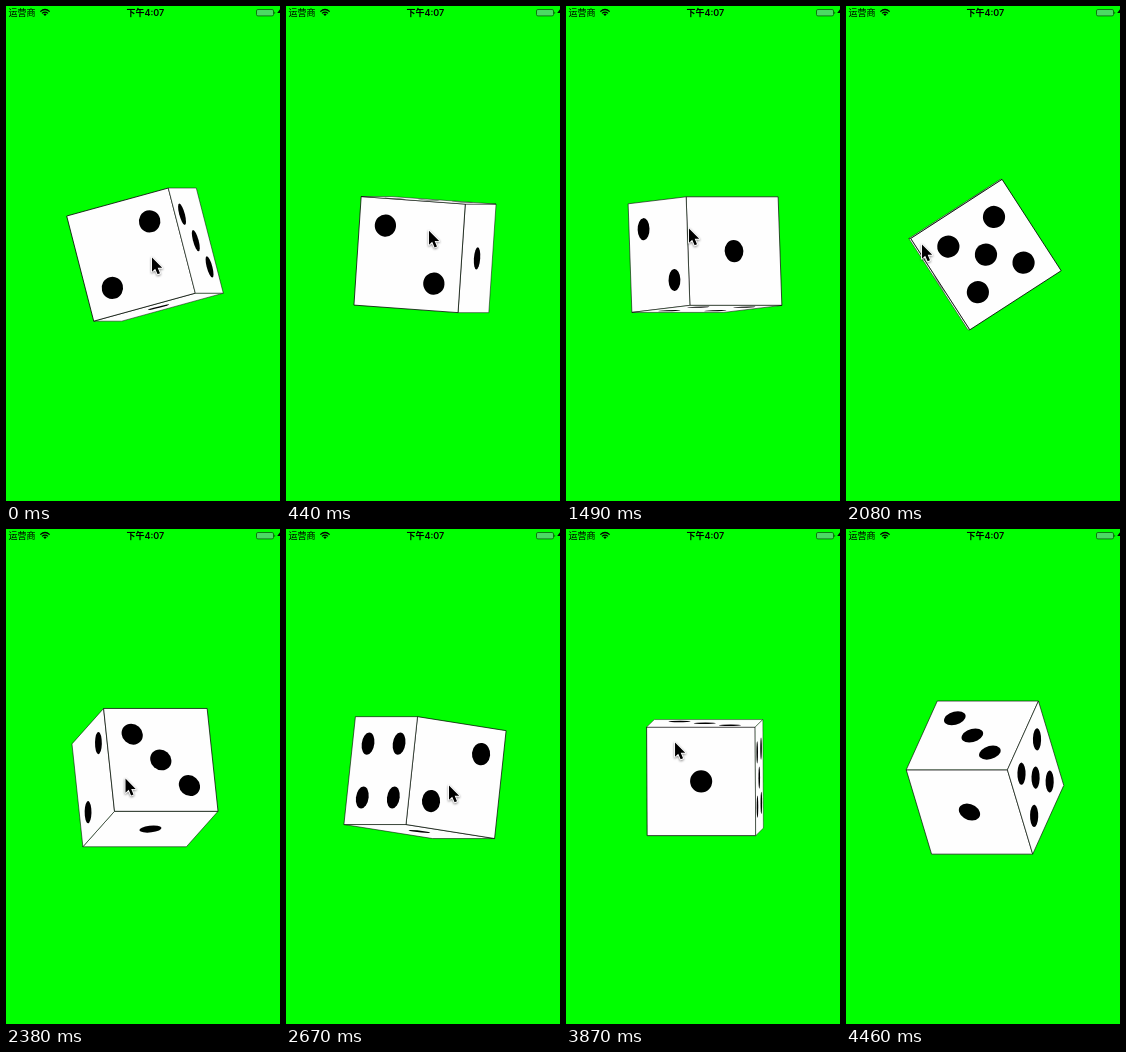
Animation of 274x495 px, one loop 4.75 s. Source, as an HTML page:

```html
<!DOCTYPE html>
<html lang="zh">
<head>
<meta charset="utf-8">
<title>Dice</title>
<style>
  html, body { margin: 0; width: 100%; height: 100%; overflow: hidden; background: #0f0; }
  svg { display: block; width: 100%; height: 100%; }
  text { font: 9px Inter, "Noto Sans CJK SC", "Noto Sans CJK", sans-serif; }
  .time { font-weight: 600; text-anchor: middle; }
  #cursor { filter: drop-shadow(0 1px .8px rgba(0, 0, 0, .45)); }
</style>
</head>
<body>
<svg viewBox="0 0 274 495">
  <rect width="274" height="495" fill="#0f0"/>
  <text x="2.6" y="9.8">运营商</text>
  <g fill="none" stroke="#000" stroke-width="1.2">
    <path d="M34.3 5.6Q39 1.4 43.7 5.6M36 7.4Q39 4.8 42 7.4"/>
    <path d="M37.3 8.2Q39 7 40.7 8.2L39 10Z" fill="#000" stroke="none"/>
  </g>
  <text class="time" x="139.4" y="9.8">下午4:07</text>
  <rect x="250.5" y="3.5" width="17" height="6.4" rx="1.4" fill="#4cd964" stroke="#0a5a0a" stroke-width=".8"/>
  <path d="M268.6 5.4v2.6q1.2-1.3 0-2.6M274.5 2.6L271.2 7H274V10.4H274.5Z"/>
  <g id="cube" transform="translate(139 248.6)"></g>
  <path id="cursor" d="M0 0V14.2L3.2 11.2L5.6 16.8L8 15.8L5.7 10.3H10.2Z"
        stroke="#fff" stroke-width="1.8" stroke-linejoin="round" paint-order="stroke"/>
</svg>
<script>
const LOOP = 4750, TICK = 148.6;
const EDGE = 108.8, HALF = EDGE / 2, PIP = EDGE / 4, RADIUS = 11.1, BORDER = 0.75;

// tick, yaw, pitch (degrees), cursor x, cursor y
const keys = [
  [0, 75.1, -75.1, 146, 251.5],
  [6, 71.2, 38.7, 139, 208.5],
  [10, 32.3, 3.7, 123, 222.5],
  [14, -89, -32.9, 76, 238.5],
  [18, 124.8, -97.4, 163, 256.5],
  [22, 28.2, 60.9, 122, 198.5],
  [23, 28.2, 60.9, 122, 198.5],
  [28, -21.6, -39.2, 102, 239],
  [29, -21.6, -39.2, 241, 450],
  [30, -21.6, -39.2, 241, 450]
];
const HIDE_CURSOR = 30;

// Each face: u axis, v axis, outward normal, pips in (u, v)
const X = [1, 0, 0], Y = [0, 1, 0], Z = [0, 0, 1];
const neg = v => v.map(c => -c);
const diagonal = [[-1, -1], [1, 1]], corners = [...diagonal, [-1, 1], [1, -1]], center = [0, 0];
const faces = [
  [X, Y, Z, [center]],
  [Y, Z, neg(X), diagonal],
  [X, Z, neg(Y), [...diagonal, center]],
  [X, Z, Y, corners],
  [Y, Z, X, [...corners, center]],
  [X, Y, neg(Z), [...corners, [-1, 0], [1, 0]]]
];

const cube = document.getElementById('cube');
const cursor = document.getElementById('cursor');

function add(parent, tag, attrs) {
  const node = document.createElementNS('http://www.w3.org/2000/svg', tag);
  for (const name in attrs) node.setAttribute(name, attrs[name]);
  return parent.appendChild(node);
}

// Borders straddle the edges, so neighbouring faces share one line
const groups = faces.map(([, , , pips]) => {
  const group = add(cube, 'g', {});
  add(group, 'rect', {
    x: -HALF, y: -HALF, width: EDGE, height: EDGE,
    fill: '#fefefe', stroke: '#000', 'stroke-width': BORDER
  });
  for (const [u, v] of pips) add(group, 'circle', { cx: u * PIP, cy: v * PIP, r: RADIUS });
  return group;
});

// Monotone cubic interpolation: eases at turning points, never overshoots
function secant(i, c) {
  i = Math.max(0, Math.min(keys.length - 2, i));
  return (keys[i + 1][c] - keys[i][c]) / (keys[i + 1][0] - keys[i][0]);
}
function slope(i, c) {
  const a = secant(i - 1, c), b = secant(i, c);
  return a * b > 0 ? 2 * a * b / (a + b) : 0;
}
function valueAt(tick, c) {
  let i = 0;
  while (i < keys.length - 2 && tick >= keys[i + 1][0]) i++;
  const span = keys[i + 1][0] - keys[i][0];
  const s = (tick - keys[i][0]) / span, r = 1 - s;
  return keys[i][c] * (1 + 2 * s) * r * r + keys[i + 1][c] * (3 - 2 * s) * s * s
    + span * s * r * (slope(i, c) * r - slope(i + 1, c) * s);
}

// Pitch about the cube's own x axis, then yaw about the screen's y axis
function rotator(yaw, pitch) {
  const [sy, cy, sp, cp] = [Math.sin(yaw), Math.cos(yaw), Math.sin(pitch), Math.cos(pitch)];
  return ([x, y, z]) => {
    const depth = y * sp + z * cp;
    return [x * cy + depth * sy, y * cp - z * sp, depth * cy - x * sy];
  };
}

function draw(now) {
  const tick = Math.min(30, Math.floor((now % LOOP + 5) / TICK));
  const [yaw, pitch, x, y] = [1, 2, 3, 4].map(c => valueAt(tick, c));
  const rotate = rotator(yaw * Math.PI / 180, pitch * Math.PI / 180);
  faces.forEach(([u, v, n], i) => {
    const [a, b] = rotate(u), [c, d] = rotate(v), [nx, ny, nz] = rotate(n);
    const matrix = [a, b, c, d, nx * HALF, ny * HALF].map(k => k.toFixed(5));
    groups[i].setAttribute('transform', `matrix(${matrix})`);
    groups[i].setAttribute('visibility', nz > 0.001 ? 'visible' : 'hidden');
  });
  cursor.setAttribute('transform', `translate(${x} ${y})`);
  cursor.setAttribute('visibility', tick < HIDE_CURSOR ? 'visible' : 'hidden');
}

const start = performance.now();
function frame() {
  draw(performance.now() - start);
  requestAnimationFrame(frame);
}
frame();
</script>
</body>
</html>
```
